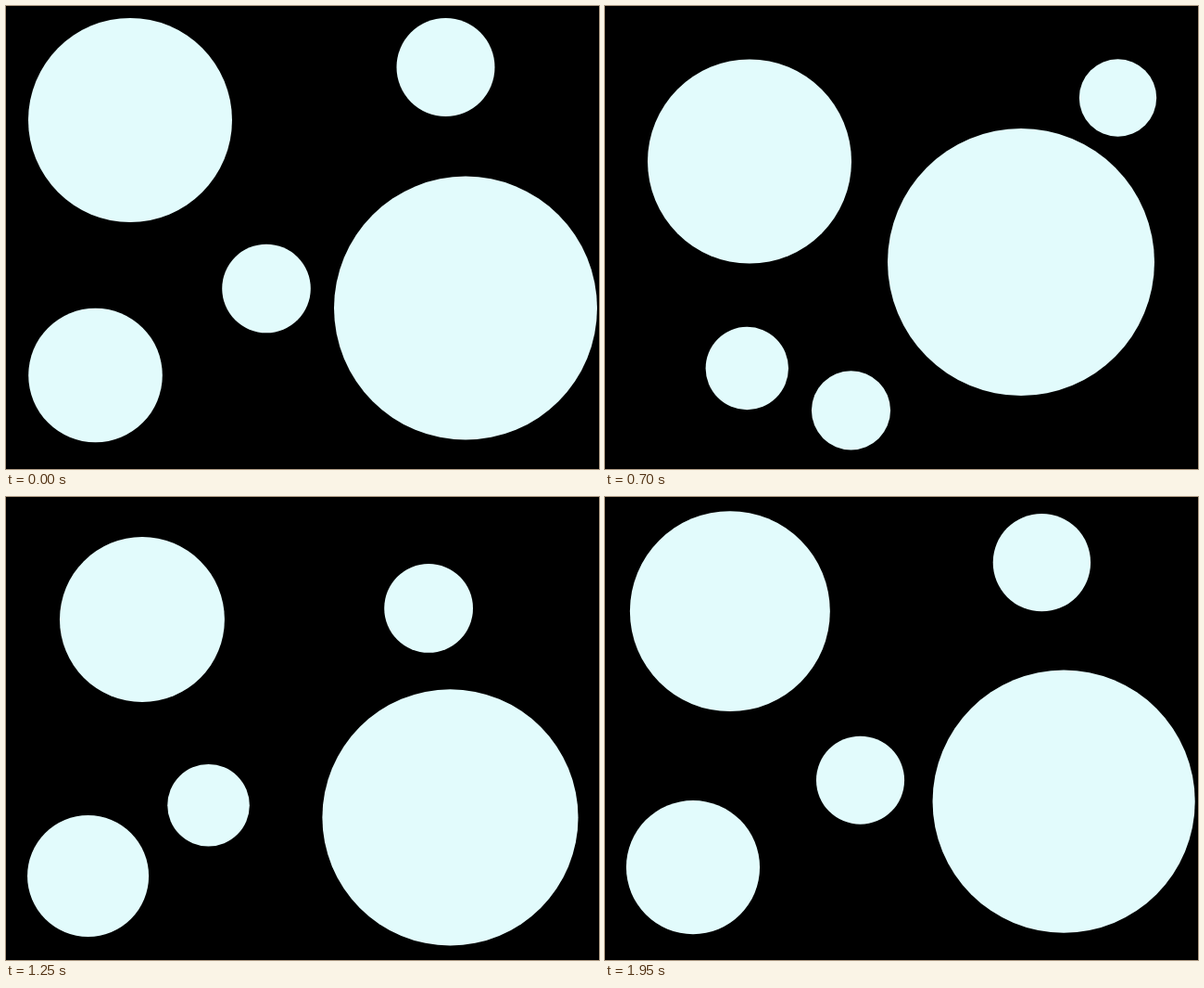
An HTML page with a canvas for the animation above (2 s loop, 640 by 499 pixels).

```html
<!DOCTYPE html>
<html lang="en">
<head>
<meta charset="utf-8">
<title>Bubbles</title>
<style>
html, body { margin: 0; width: 100%; height: 100%; overflow: hidden; background: #000; }
canvas { display: block; }
</style>
</head>
<body>
<canvas id="stage" width="640" height="499"></canvas>
<script>
const ctx = document.getElementById('stage').getContext('2d');
const LOOP = 2000, STEP = 50, FIRST_TURN = 700;

// Every bubble runs a triangle a -> b -> c -> a; corners are x, y, radius.
// The two upper bubbles make their second turn slightly later.
const bubble = (turn, a, b, c) => ({ turn, a, b, c });
const bubbles = [
  bubble(1367, [134, 123, 110], [156, 167.5, 110], [145, 124.5, 84.5]),
  bubble(1367, [474.5, 66, 53], [553.5, 99, 41.7], [435.4, 124.4, 49.2]),
  bubble(1350, [496, 325.6, 142], [449, 276, 144], [485, 358, 137]),
  bubble(1350, [96.5, 398, 72.3], [153.3, 390.5, 44.7], [76.8, 411.8, 69.3]),
  bubble(1350, [281, 304.5, 47.8], [265.5, 435.8, 42.6], [210, 313.4, 44.6])
];

const mix = (p, q, u) => p.map((v, i) => v + (q[i] - v) * u);

function poseAt({ turn, a, b, c }, t) {
  if (t < FIRST_TURN) return mix(a, b, t / FIRST_TURN);
  if (t < turn) return mix(b, c, (t - FIRST_TURN) / (turn - FIRST_TURN));
  return mix(c, a, (t - turn) / (LOOP - turn));
}

function draw(t) {
  ctx.fillStyle = '#000';
  ctx.fillRect(0, 0, 640, 499);
  ctx.fillStyle = '#e2fbfc';
  for (const b of bubbles) {
    const [x, y, r] = poseAt(b, t);
    ctx.beginPath();
    ctx.arc(x, y, r, 0, Math.PI * 2);
    ctx.fill();
  }
}

const start = performance.now();

function tick() {
  const t = (performance.now() - start) % LOOP;
  draw(Math.floor(t / STEP) * STEP);
  requestAnimationFrame(tick);
}
tick();
</script>
</body>
</html>
```
